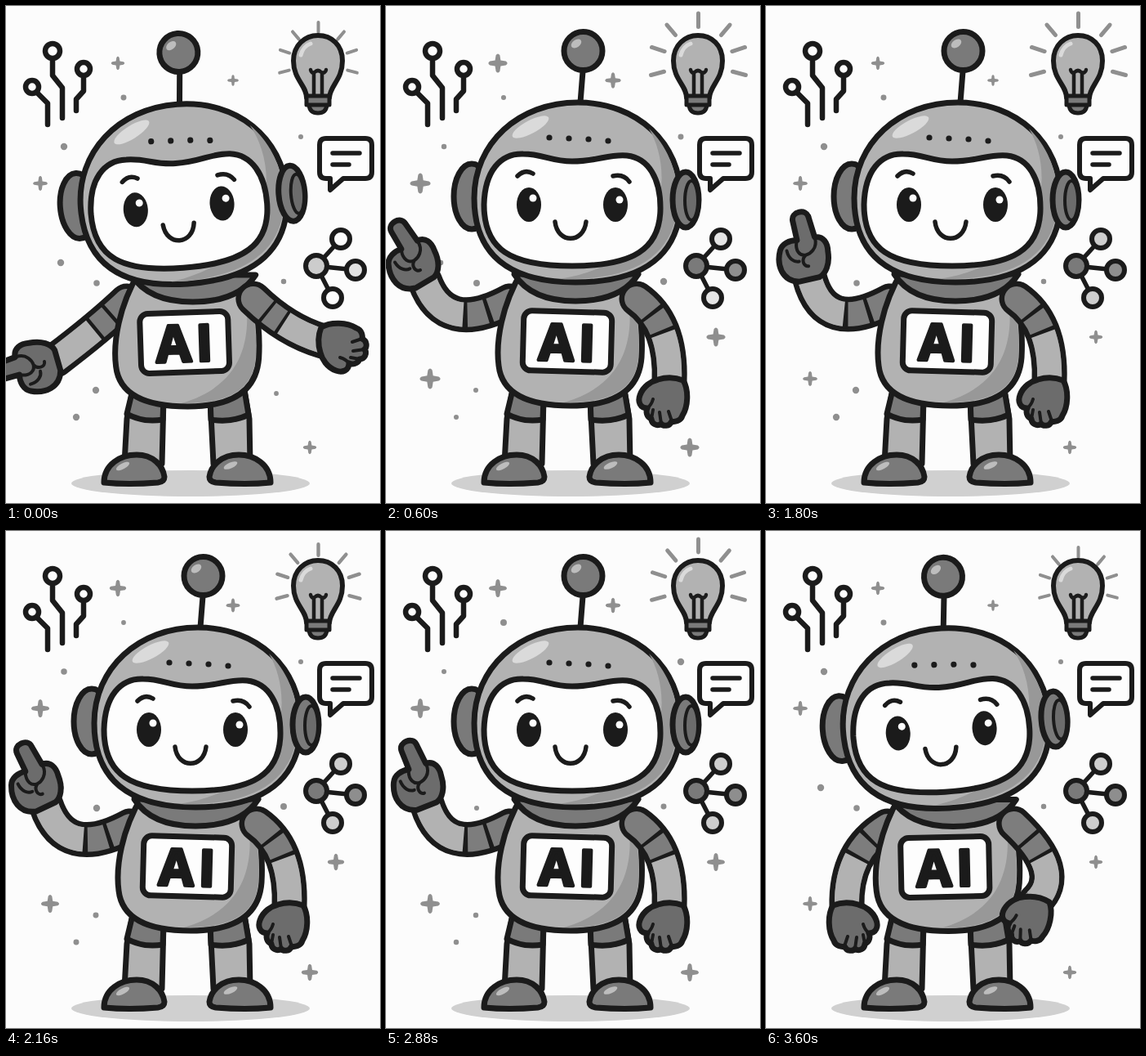
An HTML page for the animation above (3.72 s loop, 458 px wide and 608 px high).

```html
<!DOCTYPE html>
<html lang="en">
<head>
<meta charset="utf-8">
<title>Robot</title>
<style>
html, body { margin: 0; width: 100%; height: 100%; overflow: hidden; background: #fcfcfc; }
svg { display: block; }
path, circle, ellipse, rect { stroke-linejoin: round; stroke-linecap: round; }
.ink { stroke: #1b1b1b; stroke-width: 7; }
.thin { stroke: #1b1b1b; stroke-width: 6; }
.line { fill: none; stroke: #1b1b1b; stroke-width: 5.5; }
.fine { stroke-width: 4; }
.light { fill: #b2b2b2; }
.shade { fill: #989898; }
.dark { fill: #7a7a7a; }
.glove { fill: #6c6c6c; }
.shine { fill: #dadada; }
.paper { fill: #fdfdfd; }
.black { fill: #1b1b1b; }
.mute { fill: #8f8f8f; }
.arm > path { fill: none; }
.arm .edge { stroke: #1b1b1b; stroke-width: 43; }
.arm .sleeve { stroke: #7d7d7d; stroke-width: 30; }
.arm .fore { stroke: #b2b2b2; stroke-width: 30; stroke-linecap: butt; stroke-dasharray: 0 44 100; }
.arm .bands { stroke: #1b1b1b; stroke-width: 35; stroke-linecap: butt; stroke-dasharray: 0 21 4 18.5 4 200; }
</style>
</head>
<body>
<svg width="458" height="608" viewBox="0 0 458 608">
  <defs>
    <linearGradient id="dim" x1="0" y1="0" x2="0" y2="1">
      <stop offset=".1" stop-color="#c6c6c6"/>
      <stop offset=".5" stop-color="#d6d6d6"/>
      <stop offset=".95" stop-color="#fafafa"/>
    </linearGradient>
  </defs>

  <g id="sparks" class="mute"></g>
  <path id="rays" fill="none" stroke="#8f8f8f"/>

  <!-- circuit -->
  <g class="line" style="stroke-width:6.5">
    <path d="M57 66V85L69 100V137M95 86V104L86 114V128M38 106L51 119V145"/>
    <circle cx="57" cy="55" r="9"/><circle cx="95" cy="77" r="8"/><circle cx="32" cy="99" r="8"/>
  </g>

  <!-- bulb -->
  <path class="thin light" d="M368 112C368 97 352 90 352 67C352 48 366 36 382 36C399 36 412 48 412 67C412 90 397 97 396 112Z"/>
  <path d="M361 60Q364 49 373 46" fill="none" stroke="#dadada" stroke-width="5"/>
  <path class="line" style="stroke-width:4.5" d="M377 108V82M387 108V82M373 78Q374 83 378 81Q382 77 386 81Q391 83 392 78"/>
  <path class="thin dark" style="stroke-width:5" d="M368 110H396V121H368ZM371 121H393Q392 131 382 131Q372 131 371 121Z"/>

  <!-- speech bubble -->
  <path class="thin paper" d="M392 162H440Q448 162 448 170V203Q448 211 440 211H413L397 225V211H392Q384 211 384 203V170Q384 162 392 162Z"/>
  <path class="line" d="M400 180H433M400 194H420"/>

  <!-- network -->
  <path class="line" d="M380 318L410 285M380 318L428 323M380 318L400 357"/>
  <g id="nodes" class="thin">
    <circle cx="410" cy="285" r="11"/><circle cx="400" cy="357" r="11"/>
    <circle cx="380" cy="318" r="13"/><circle cx="428" cy="323" r="11"/>
  </g>

  <!-- legs -->
  <ellipse cx="226" cy="584" rx="146" ry="16" fill="#d0d0d0"/>
  <g class="ink">
    <path class="light" d="M155 470L148 505L145 560H191L193 480Z"/>
    <path class="light" d="M250 480L254 560H299L298 505L292 470Z"/>
    <path class="dark" d="M155 470L148 499Q168 510 192 506L193 480Z"/>
    <path class="dark" d="M250 480L251 506Q276 510 297 500L292 470Z"/>
    <path class="dark" d="M120 583C120 561 140 549 160 549C180 549 192 562 194 576Q194 582 186 583Q150 586 120 583Z"/>
    <path class="dark" d="M324 583C324 561 304 549 285 549C264 549 251 562 249 576Q249 582 257 583Q294 586 324 583Z"/>
  </g>
  <ellipse class="shine" cx="143" cy="563" rx="9" ry="3.5" transform="rotate(-28 143 563)" opacity=".7"/>
  <ellipse class="shine" cx="275" cy="562" rx="9" ry="3.5" transform="rotate(-24 275 562)" opacity=".7"/>

  <g id="left" class="arm"></g>

  <g id="torso">
    <path class="ink light" d="M166 325C142 366 134 410 138 440C142 475 175 489 226 489C280 489 310 470 313 430C315 395 310 358 296 325Z"/>
    <path class="shade" d="M296 350C304 400 298 462 218 485C278 486 306 467 309 430C311 395 307 372 296 350Z"/>
    <path class="ink dark" d="M157 328Q178 361 232 361Q288 361 309 328Z"/>
    <g id="panel">
      <rect class="ink paper" x="168" y="374" width="108" height="73" rx="10"/>
      <text x="187" y="434" font-family="'Open Sans', 'Liberation Sans', sans-serif" font-weight="700" font-size="62"
        letter-spacing="6" fill="#1b1b1b" stroke="#1b1b1b" stroke-width="4" stroke-linejoin="round">AI</text>
    </g>
  </g>

  <g id="right" class="arm"></g>

  <g id="head">
    <g class="ink">
      <path d="M238 118L241 80"/>
      <circle class="dark" cx="241.5" cy="55" r="23.5"/>
      <ellipse class="dark" cx="105" cy="233" rx="22" ry="40"/>
      <path class="light" d="M235 118C162 118 108 168 108 235C108 304 150 338 232 338C316 338 361 304 361 235C361 168 308 118 235 118Z"/>
    </g>
    <path class="shade" d="M322 150C352 200 350 312 212 334C308 337 357 302 357 235C357 200 343 170 322 150Z"/>
    <ellipse class="shine" cx="233" cy="46" rx="7" ry="4.5" transform="rotate(-35 233 46)" opacity=".7"/>
    <ellipse class="shine" cx="177" cy="148" rx="25" ry="8" transform="rotate(-28 177 148)"/>
    <g class="black">
      <circle cx="200" cy="161" r="3.6"/><circle cx="224" cy="162" r="3.6"/>
      <circle cx="248" cy="163" r="3.6"/><circle cx="272" cy="165" r="3.6"/>
    </g>
    <g class="ink">
      <ellipse class="dark" cx="367" cy="237" rx="16" ry="34"/>
      <ellipse class="glove" cx="374" cy="238" rx="8" ry="24" style="stroke-width:4"/>
      <path id="face" d="M228 190C260 190 272 181 295 183C322 186 336 212 336 247C336 298 302 318 228 318C152 318 120 298 120 243C121 202 140 180 168 181C192 181 202 190 228 190Z"/>
    </g>
    <g id="awake">
      <g class="black"><ellipse cx="175" cy="243" rx="15" ry="21"/><ellipse cx="281" cy="243" rx="15" ry="21"/></g>
      <g class="paper"><circle cx="180" cy="235" r="4.5"/><circle cx="286" cy="237" r="4.5"/></g>
      <path class="line" d="M161 208Q170 199 180 205M278 208Q291 205 298 215M207 264C210 291 242 291 245 264"/>
    </g>
    <g id="blink">
      <path class="black" d="M159 247Q175 243 189 246Q190 265 175 265Q160 265 159 247ZM265 246Q279 243 295 247Q295 269 280 269Q265 268 265 246Z"/>
      <path class="line" d="M207 274Q213 287 225 287Q238 287 244 274"/>
    </g>
  </g>
</svg>

<script>
const STEP = 120, STEPS = 31;
const $ = id => document.getElementById(id);
const set = (el, name, value) => el.setAttribute(name, value);
const gray = v => `rgb(${v},${v},${v})`;
const mix = (a, b, k) => a + (b - a) * k;
const pulse = (n, peak, period) => (1 + Math.cos((n - peak) / period * 2 * Math.PI)) / 2;

// Linear tracks: [step, values]
const neutral = [0, 0, 0], nod = [-3.4, -7, 1];
const headTrack = [[0, [-4.2, -8.5, 2]], [3, neutral], [24, neutral], [26, [-.3, -3, 3.5]], [28.5, nod], [30, nod]];

// Arm values: bend x, y, wrist x, y, hand angle
const hanging = [350, 388, 347, 460, 180], hip = [368, 418, 330, 453, 190], rest = [97, 392, 99, 460, -180];
const rightTrack = [[0, [343, 397, 388, 410, 90]], [3, hanging], [26, hanging], [28.5, hip], [30, hip]];

// The raised finger swings from side to side
function wag(n) {
  const angle = mix(15, -33, pulse(n, 0, 4.65));
  return [72, 404, 57.5 + angle / 3, 329.5 - angle * .22, angle];
}
const leftTrack = n => [[0, [114, 393, 61, 433, -106]], [2.5, wag(n)], [24.3, wag(n)],
  [26, [111, 396, 53, 414, -93]], [28, rest], [30, rest]];

function sample(track, n) {
  const i = Math.max(1, track.findIndex(key => key[0] >= n));
  const [a, from] = track[i - 1], [b, to] = track[i];
  return from.map((v, j) => mix(v, to[j], (n - a) / (b - a)));
}

const POINTING = `<g class="point"><path class="ink glove" d="M-14 2C-34-4-36-24-28-40C-24-48-14-50-5-48L-5-72C-5-84 15-84 15-72L17-47C28-46 31-36 29-26C28-10 20 0 12 2Z"/>
  <path class="line fine" d="M-20-38C-20-28-14-22-8-22M-6-46C-10-36-6-28 2-28M17-46C18-32 6-28 2-28C-6-24-4-14 2-14"/></g>`;
const OPEN = `<g class="open"><path class="ink glove" d="M-17 2C-24-10-23-30-16-41C-14-48-6-49-3-48C0-55 8-54 10-51C15-55 22-51 22-45C28-43 29-36 27-32C36-32 39-24 36-16C32-5 22 1 14 3Q-2 8-17 2Z"/>
  <path class="line fine" d="M-3-48L1-36M10-51L12-37M22-45L20-34M27-32Q22-28 20-21"/></g>`;

for (const id of ['left', 'right'])
  $(id).innerHTML = ['edge', 'sleeve', 'fore', 'bands'].map(c => `<path class="${c}" pathLength="100"/>`).join('') +
    `<g class="hand">${POINTING}${OPEN}</g>`;

function poseArm(id, x, y, [bx, by, wx, wy, angle], pointing) {
  const arm = $(id), find = c => arm.querySelector(c);
  for (const p of arm.children)
    if (p.tagName === 'path') set(p, 'd', `M${x} ${y}Q${bx} ${by} ${wx} ${wy}`);
  const flip = id === 'left' && !pointing ? -1 : 1;
  set(find('.hand'), 'transform', `translate(${wx} ${wy}) rotate(${angle}) scale(${flip} 1)`);
  find('.point').style.display = pointing ? '' : 'none';
  find('.open').style.display = pointing ? 'none' : '';
}

// Stars: x, y, size; dots: x, y, peak step
const stars = [[137, 70, 12], [278, 91, 10], [42, 217, 13], [404, 405, 12], [54, 456, 13], [372, 540, 12]];
const dots = [[144, 112, 11], [71, 172, 0], [361, 160, 9], [67, 314, 0], [111, 339, 3],
  [340, 337, 5], [110, 470, 14], [86, 503, 14], [331, 474, 8]];
const STAR = 'M-2.5-10Q0-14 2.5-10L3.5-3.5L10-2.5Q14 0 10 2.5L3.5 3.5L2.5 10Q0 14-2.5 10L-3.5 3.5L-10 2.5Q-14 0-10-2.5L-3.5-3.5Z';

function drawSparks(n) {
  const grow = mix(.67, 1, pulse(n, 6.5, 15)) / 12;
  $('sparks').innerHTML =
    stars.map(([x, y, s]) => `<path d="${STAR}" transform="translate(${x} ${y}) scale(${s * grow})"/>`).join('') +
    dots.map(([x, y, peak]) => `<circle cx="${x}" cy="${y}" r="${mix(2.9, 4.2, pulse(n, peak, 15))}"/>`).join('');
}

function drawRays(n) {
  const k = pulse(n, 5, 10), near = mix(37, 43.5, k), far = mix(49, 60, k);
  const at = (deg, r) => {
    const a = deg * Math.PI / 180;
    return `${382.5 + r * Math.sin(a)} ${69 - r * Math.cos(a)}`;
  };
  set($('rays'), 'd', [-105, -72, -40, 0, 40, 72, 105].map(d => `M${at(d, near)}L${at(d, far)}`).join(''));
  set($('rays'), 'stroke-width', mix(4, 5, k));
}

function draw(n) {
  drawSparks(n);
  drawRays(n);
  const fast = Math.min(1, n / 5), slow = Math.min(1, n / 10);
  const tones = [mix(252, 206, slow), mix(252, 206, slow), mix(204, 122, fast), mix(226, 142, fast)];
  tones.forEach((v, i) => set($('nodes').children[i], 'fill', gray(Math.round(v))));

  const [turn, dx, dy] = sample(headTrack, n);
  set($('head'), 'transform', `translate(${dx} ${dy}) rotate(${turn} 230 350)`);
  set($('torso'), 'transform', `translate(${turn * .8} ${dy * .5})`);
  set($('panel'), 'transform', `rotate(${1.5 + turn * .8} 222 410)`);
  poseArm('left', 152 + turn, 361, sample(leftTrack(n), n), n < 27);
  poseArm('right', 307 + turn, 358, sample(rightTrack, n), false);

  const closed = n >= 25 && n <= 27;
  $('awake').style.display = closed ? 'none' : '';
  $('blink').style.display = closed ? '' : 'none';
  set($('face'), 'fill', closed ? 'url(#dim)' : '#fdfdfd');
}

const start = performance.now();
function tick() {
  draw(Math.floor((performance.now() - start) / STEP) % STEPS);
  requestAnimationFrame(tick);
}
tick();
</script>
</body>
</html>
```
